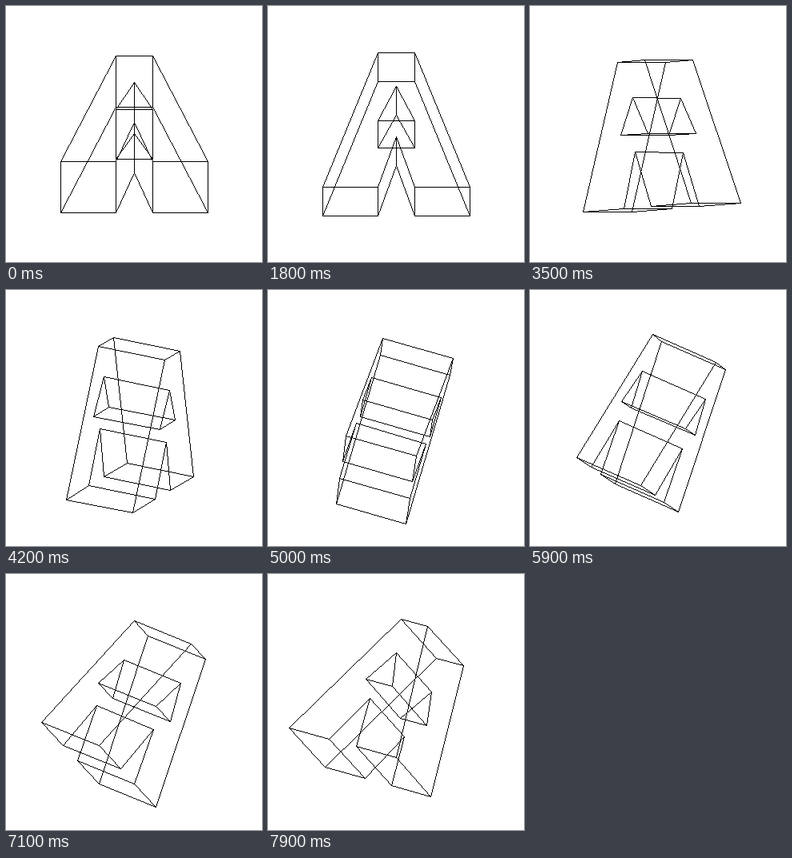
These frames come from a looping animation (320 px wide and 320 px high, 8 s). An HTML page with a canvas:

```html
<!DOCTYPE html>
<html>
<head>
<meta charset="utf-8">
<style>
  html, body { margin: 0; width: 100%; height: 100%; overflow: hidden; background: #fff; }
  canvas { display: block; }
</style>
</head>
<body>
<canvas id="stage" width="320" height="320"></canvas>
<script>
const ctx = document.getElementById('stage').getContext('2d');
const UNIT = 46, CENTER = 160, LOOP = 8000, HOLD = 1200, STEP = 100;

// Letter outline and counter, in units, y pointing down.
const contours = [
  [[-.5, -2], [.5, -2], [2, 2], [.5, 2], [0, .5], [-.5, 2], [-2, 2]],
  [[0, -1], [.5, 0], [-.5, 0]]
];

// Turning points as [step, degrees].
const pitchKeys = [[0, 44], [18, -10], [21, 4], [37.5, -31.5], [48, -3.4], [53, -11], [62, -12], [68, 16.9]];
const yawKeys = [[12, 0], [42, 105], [48, 108.2], [60, 122.9], [68, 136.4]];

const progress = (v, from, to) => Math.min(1, Math.max(0, (v - from) / (to - from)));

function smooth(v, from, to) {
  const f = progress(v, from, to);
  return f * f * (3 - 2 * f);
}

function track(keys, step) {
  return keys.slice(1).reduce(
    (sum, [end, value], i) => sum + (value - keys[i][1]) * progress(step, keys[i][0], end),
    keys[0][1]
  );
}

function poseAt(step) {
  const pitch = track(pitchKeys, step), yaw = track(yawKeys, step);
  // The letter leans over as it turns.
  const roll = 33.5 * smooth(yaw, 40, 134) - 2.6 * smooth(yaw, 10, 40);
  return [pitch, yaw, roll].map(degrees => degrees * Math.PI / 180);
}

function turn(u, v, angle) {
  const c = Math.cos(angle), s = Math.sin(angle);
  return [u * c - v * s, u * s + v * c];
}

function project(x, y, z, [pitch, yaw, roll]) {
  [z, x] = turn(z, x, yaw);
  [y, z] = turn(y, z, pitch);
  [x, y] = turn(x, y, roll);
  return [x, y].map(v => CENTER + Math.trunc(v * UNIT));
}

// One-pixel line without smoothing.
function line([x0, y0], [x1, y1]) {
  const n = Math.max(Math.abs(x1 - x0), Math.abs(y1 - y0), 1);
  for (let i = 0; i <= n; i++) {
    ctx.fillRect(Math.round(x0 + (x1 - x0) * i / n), Math.round(y0 + (y1 - y0) * i / n), 1, 1);
  }
}

function draw(time) {
  const t = time % LOOP;
  const step = t < HOLD ? 0 : Math.floor((t - HOLD) / STEP) + 1;
  const pose = poseAt(step);
  ctx.fillStyle = '#fff';
  ctx.fillRect(0, 0, 320, 320);
  ctx.fillStyle = '#000';
  for (const contour of contours) {
    const [front, back] = [-1, 1].map(z => contour.map(([x, y]) => project(x, y, z, pose)));
    front.forEach((p, i) => {
      const next = (i + 1) % front.length;
      line(p, front[next]);
      line(back[i], back[next]);
      line(p, back[i]);
    });
  }
}

function frame() {
  draw(performance.now());
  requestAnimationFrame(frame);
}
frame();
</script>
</body>
</html>
```
